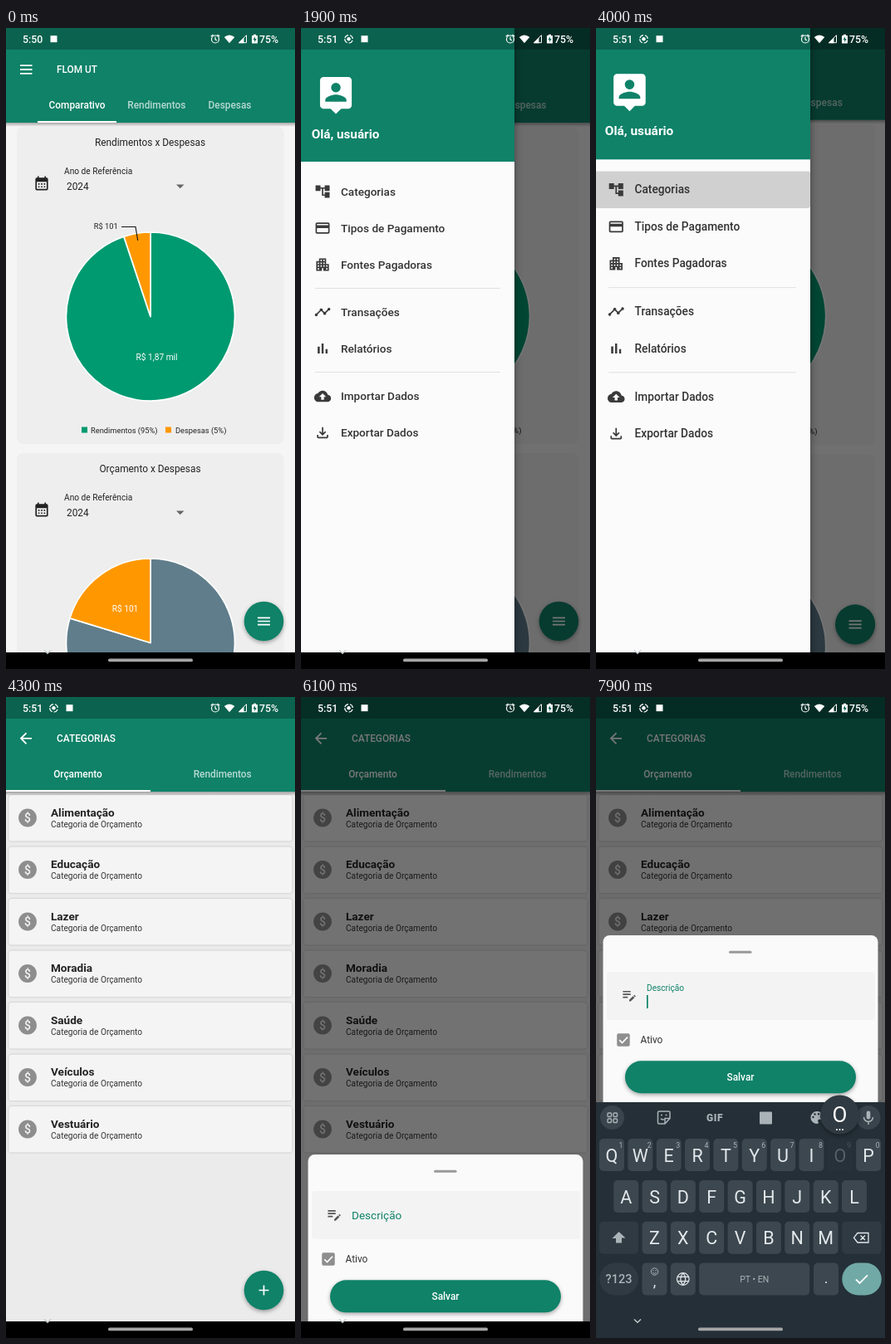
An HTML page for the animation above (8000 ms loop, 348x772 px).

```html
<!DOCTYPE html>
<html lang="pt">
<head>
<meta charset="utf-8">
<title>Finanças</title>
<style>
html, body { margin: 0; width: 100%; height: 100%; overflow: hidden; background: #000; }
svg { display: block; width: 100%; height: 100%; font-family: Roboto, "Noto Sans", sans-serif; }
.lift { filter: drop-shadow(0 2px 2.5px rgba(0,0,0,.35)); }
.card { filter: drop-shadow(0 .8px .8px rgba(0,0,0,.22)); }
.side { filter: drop-shadow(1px 0 4px rgba(0,0,0,.35)); }
</style>
</head>
<body>
<svg id="stage" viewBox="0 0 348 772" xmlns="http://www.w3.org/2000/svg"></svg>
<script>
const LOOP = 8000, STEP = 100;
const GREEN = '#0f8268', ORANGE = '#ff9800', INK = '#232323', DP = 0.847;
const PANEL = 257, SHEET = 201, KEYS = 284;

const ICONS = {
  tree: 'M22 11V3h-7v3H9V3H2v8h7V8h2v10h4v3h7v-8h-7v3h-2V8h2v3z',
  card: 'M20 4H4c-1.1 0-2 .9-2 2v12c0 1.1.9 2 2 2h16c1.1 0 2-.9 2-2V6c0-1.1-.9-2-2-2zm0 14H4v-6h16v6zm0-10H4V6h16v2z',
  building: 'M17 11V3H7v4H3v14h8v-4h2v4h8V11h-4zM7 19H5v-2h2v2zm0-4H5v-2h2v2zm0-4H5V9h2v2zm4 4H9v-2h2v2zm0-4H9V9h2v2zm0-4H9V5h2v2zm4 8h-2v-2h2v2zm0-4h-2V9h2v2zm0-4h-2V5h2v2zm4 12h-2v-2h2v2zm0-4h-2v-2h2v2z',
  line: 'M1 16a2 2 0 0 1 2.500-1.900L8.100 9.500A2 2 0 1 1 11.900 9.500L14.500 12.100H15.500L19.100 8.500A2 2 0 1 1 20.500 9.900L16.900 13.500A2 2 0 1 1 13.100 13.500L10.500 10.900H9.500L4.900 15.500A2 2 0 1 1 1 16z',
  bars: 'M5 9.200h3V19H5zM10.600 5h2.800v14h-2.800zm5.600 8H19v6h-2.800z',
  cloud: 'M19.350 10C18.700 6.600 15.600 4 12 4 9.100 4 6.600 5.600 5.350 8 2.300 8.400 0 10.900 0 14c0 3.300 2.700 6 6 6h13c2.800 0 5-2.200 5-5 0-2.600-2-4.800-4.650-5zM14 13v4h-4v-4H7l5-5 5 5h-3z',
  save: 'M18 15v3H6v-3H4v3c0 1.100.9 2 2 2h12c1.100 0 2-.9 2-2v-3h-2zm-1-4l-1.400-1.400L13 12.200V4h-2v8.200L8.400 9.600 7 11l5 5 5-5z',
  person: 'M19 2H5a2 2 0 0 0-2 2v14a2 2 0 0 0 2 2h4l3 3 3-3h4a2 2 0 0 0 2-2V4a2 2 0 0 0-2-2zm-7 3.300a2.700 2.700 0 1 1 0 5.400 2.700 2.700 0 0 1 0-5.400zM18 16H6v-.9c0-2 4-3.100 6-3.100s6 1.100 6 3.100v.9z',
  month: 'M19 4h-1V2h-2v2H8V2H6v2H5a2 2 0 0 0-2 2v14a2 2 0 0 0 2 2h14a2 2 0 0 0 2-2V6a2 2 0 0 0-2-2zm0 16H5V10h14v10zM9 14H7v-2h2v2zm4 0h-2v-2h2v2zm4 0h-2v-2h2v2zm-8 4H7v-2h2v2zm4 0h-2v-2h2v2zm4 0h-2v-2h2v2z',
  note: 'M3 10h11v2H3v-2zm0-2h11V6H3v2zm0 8h7v-2H3v2zm15-3.100l.7-.7a1 1 0 0 1 1.400 0l.7.7a1 1 0 0 1 0 1.400l-.7.7-2.100-2.100zm-.7.700l-5.300 5.300V21h2.100l5.300-5.300-2.100-2.100z'
};

// Markup helpers
const rect = (x, y, w, h, fill, r = 0, more = '') =>
  `<rect x="${x}" y="${y}" width="${w}" height="${h}" rx="${r}" fill="${fill}" ${more}/>`;
const disc = (x, y, r, fill, more = '') => `<circle cx="${x}" cy="${y}" r="${r}" fill="${fill}" ${more}/>`;
const text = (x, y, s, size, fill = INK, weight = 400, anchor = 'start', more = '') =>
  `<text x="${x}" y="${y}" font-size="${size}" fill="${fill}" font-weight="${weight}" text-anchor="${anchor}" ${more}>${s}</text>`;
const mid = (x, y, s, size, fill, weight, more) => text(x, y, s, size, fill, weight, 'middle', more);
const stroke = (d, color, w = 1.5, more = '') =>
  `<path d="${d}" fill="none" stroke="${color}" stroke-width="${w}" ${more}/>`;
const shape = (d, fill, more = '') => `<path d="${d}" fill="${fill}" ${more}/>`;
const icon = (name, cx, cy, fill, k = DP) =>
  `<path d="${ICONS[name]}" fill="${fill}" transform="translate(${cx - 12 * k} ${cy - 12 * k}) scale(${k})"/>`;
const group = (id, body, more = '') => `<g id="${id}" ${more}>${body}</g>`;
const each = (list, fn) => [...list].map(fn).join('');

function slice(cx, cy, r, from, to, fill) {
  const at = a => `${cx + r * Math.sin(a * Math.PI / 180)} ${cy - r * Math.cos(a * Math.PI / 180)}`;
  return shape(`M${cx} ${cy}L${at(from)}A${r} ${r} 0 ${to - from > 180 ? 1 : 0} 1 ${at(to)}z`, fill,
    'stroke="#fff" stroke-width="1.700" stroke-linejoin="round"');
}

function appBar(title, nav, tabs, markX, markW) {
  return rect(0, 114, 348, 5, 'url(#fall)') + rect(0, 0, 348, 114, GREEN) +
    stroke(nav, '#fff', 1.8) + text(61, 54, title, 11.86, '#fff', 500) +
    tabs.map(([x, s], i) => mid(x, 97.2, s, 11.86, i ? 'rgba(255,255,255,.7)' : '#fff', 500)).join('') +
    rect(markX, 112, markW, 2, '#fff');
}

function fab(d) {
  return disc(310.5, 714.5, 23.8, GREEN, 'class="lift"') + stroke(d, '#fff', 1.7);
}

function chartCard(y, title, pie) {
  return rect(13, y, 321.500, 382, '#eee', 8) + mid(173.5, y + 23, title, 11.86) +
    icon('month', 43, y + 68, INK) + text(70, y + 57, 'Ano de Referência', 10.16) +
    text(73, y + 76, '2024', 11.86) + shape(`M205 ${y + 69.5}h9.500l-4.750 4.700z`, '#666') + pie;
}

function home() {
  const first = slice(174, 347.5, 101.5, 0, 341.6, '#009a70') + slice(174, 347.5, 101.5, 341.6, 360, ORANGE) +
    stroke('M139 239.500H156L158.700 256', '#111', 1.1) + text(105.7, 241.5, 'R$ 101', 9.3) +
    mid(181.5, 400.3, 'R$ 1,87 mil', 10.16, '#fff') +
    rect(91, 480.5, 7, 7, '#009a70') + text(102, 487.5, 'Rendimentos (95%)', 9.3) +
    rect(192, 480.5, 7, 7, ORANGE) + text(204, 487.5, 'Despesas (5%)', 9.3);
  const second = slice(174, 740.5, 101.5, 0, 287, '#607d8b') + slice(174, 740.5, 101.5, 287, 360, ORANGE) +
    mid(143.5, 703, 'R$ 101', 10.16, '#fff');
  return rect(0, 0, 348, 772, '#f5f5f5') + chartCard(119, 'Rendimentos x Despesas', first) +
    chartCard(512, 'Orçamento x Despesas', second) +
    appBar('FLOM UT', 'M17 45.200H31.500M17 50H31.500M17 54.800H31.500',
      [[85.5, 'Comparativo'], [181.3, 'Rendimentos'], [269.5, 'Despesas']], 38, 95) +
    fab('M303 710.300H318M303 714.500H318M303 718.700H318');
}

function drawer() {
  const rows = [[197, 'tree', 'Categorias'], [241, 'card', 'Tipos de Pagamento'], [285, 'building', 'Fontes Pagadoras'],
    [342, 'line', 'Transações'], [386, 'bars', 'Relatórios'], [443.5, 'cloud', 'Importar Dados'], [487.5, 'save', 'Exportar Dados']];
  return rect(0, 0, PANEL, 772, '#fbfbfb', 0, 'class="side"') + rect(0, 0, PANEL, 161, GREEN) +
    icon('person', 42, 80.3, '#fff', 2.12) + text(12.7, 132.5, 'Olá, usuário', 15.25, '#fff', 700) +
    group('ink', rect(0, 175, PANEL, 44, '#000', 3, 'id="glow"') +
      disc(130, 197, 1, '#000', 'id="splash" clip-path="none"'), 'clip-path="url(#row)"') +
    rect(17, 313, 223, 1, '#e0e0e0') + rect(17, 414, 223, 1, '#e0e0e0') +
    each(rows, ([y, name, s]) => icon(name, 26, y, '#3a3a3a') + text(48, y + 4.6, s, 13.55, '#333', 500));
}

function categories() {
  const names = ['Alimentação', 'Educação', 'Lazer', 'Moradia', 'Saúde', 'Veículos', 'Vestuário'];
  return rect(0, 0, 348, 772, '#ebebeb') +
    names.map((s, i) => {
      const y = 118 + 62.5 * i;
      return rect(3.4, y, 341, 55.5, '#f4f4f4', 3.5, 'class="card"') + disc(26, y + 27.5, 10.9, '#8e8e8e') +
        mid(26, y + 32.4, '$', 14, '#f4f4f4', 500) + text(54, y + 25.8, s, 13.55, INK, 700) +
        text(54, y + 38.8, 'Categoria de Orçamento', 10.16, '#333');
    }).join('') +
    appBar('CATEGORIAS', 'M31 49.800H18M24.500 43.300L18 49.800L24.500 56.300', [[86.5, 'Orçamento'], [260.7, 'Rendimentos']], 0, 174) +
    fab('M304.500 714.500H316.500M310.500 708.500V720.500');
}

function sheet() {
  return rect(8.5, 0, 331, 260, '#fafafa', 8) + rect(160, 18.8, 27.5, 3, '#999', 1.5) +
    rect(13, 44, 323, 58, '#f3f3f3', 4) + icon('note', 40, 72, '#555') +
    text(61, 77.5, 'Descrição', 13.55, '#666', 400, 'start', 'id="label"') +
    rect(61, 72, 1.7, 16, GREEN, 0, 'id="caret"') +
    rect(25.2, 118.3, 15.5, 15.5, '#8e8e8e', 2) + stroke('M28.200 126.200L31.500 129.500L38 122.700', '#fff', 1.7) +
    text(53.5, 130.3, 'Ativo', 11.86, '#333') +
    rect(35, 151.3, 278, 39, GREEN, 19.5, 'class="lift"') + mid(174, 175.2, 'Salvar', 11.86, '#fff', 500);
}

function keyboard() {
  const key = '#3c474f', dark = '#2f3a43', pale = '#e3e8eb', soft = '#aab3b8', pitch = 34.35;
  const rows = [['qwertyuiop', 19, 44], ['asdfghjkl', 36.2, 94], ['zxcvbnm', 70.5, 143.7]];
  const onKeys = fn => each(rows, ([s, x, y]) => [...s].map((c, i) => fn(c, x + pitch * i, y)).join(''));
  const letters = upper => onKeys((c, x, y) =>
    mid(x, y + (upper ? 27.5 : 26.5), upper ? c.toUpperCase() : c, 21.5, pale, 400, `class="k-${c}"`));
  const tools = disc(19.5, 18.5, 14.5, '#39444c') + disc(328, 18.5, 14.5, '#39444c') +
    each([[14, 13], [21, 13], [14, 20], [21, 20]], ([x, y]) => rect(x, y, 4.5, 4.5, 'none', 1, `stroke="${soft}" stroke-width="1.400"`)) +
    stroke('M76 11H87.500Q89 11 89 12.500V19.500L83 26H76Q74.500 26 74.500 24.500V12.500Q74.500 11 76 11zM89 19.500H83V26M78 19.500Q80 22 82 20.500', soft, 1.5) +
    disc(79, 15.5, 1, soft) + disc(84.500, 15.5, 1, soft) + mid(143, 23, 'GIF', 12, soft, 900, 'letter-spacing=".6"') +
    rect(197, 11.5, 15, 15, soft, 1) +
    shape('M266 11a7.500 7.500 0 0 0 0 15c2 0 2.300-1.500 1.500-2.500-1-1.500 0-2.700 1.500-2.700h2c1.500 0 2.700-1.300 2.700-3.500C273.500 13.500 270 11 266 11z', soft) +
    each([[261.5, 18], [263.5, 14.5], [268, 14.3], [271, 17.5]], ([x, y]) => disc(x, y, 1.2, '#242f37')) +
    rect(325.7, 10.5, 4.6, 10, soft, 2.3) + stroke('M322.500 18a5.500 5.500 0 0 0 11 0M328 23.500V27', soft, 1.5);
  const low = rect(4, 193.5, 47, 39, dark, 19.5) + mid(27.5, 218, '?123', 14.500, soft, 500) +
    rect(55.5, 193.5, 30, 39, key, 5) + mid(70.5, 222, ',', 18, pale) +
    stroke('M66.300 204a4.200 4.200 0 1 0 8.400 0a4.200 4.200 0 1 0-8.400 0M68.300 205.200q2.200 2.500 4.400 0', soft, 1) +
    disc(69, 202.8, .7, soft) + disc(72, 202.8, .7, soft) +
    rect(89.8, 193.5, 30, 39, key, 5) +
    stroke('M97.500 213a7.300 7.300 0 1 0 14.600 0a7.300 7.300 0 1 0-14.600 0M98.300 210.300h13M98.300 215.700h13M104.800 205.700q-6 7.300 0 14.600q6-7.300 0-14.600', pale, 1.2) +
    rect(124.200, 193.5, 133, 39, key, 5) + mid(190.7, 216.8, 'PT • EN', 10.5, soft) +
    rect(262, 193.5, 30, 39, key, 5) + mid(277, 218, '.', 18, pale) +
    rect(296.3, 193.5, 47.500, 39, '#70a9a6', 19.5) + stroke('M313 213.500L317.500 218L327 208.300', '#fff', 1.8);
  const arrow = 'M27.500 156L35 164H31V169.500H24V164H20z'.replace('L35 164', 'L35.500 163.500').replace('H20z', 'H19.500z');
  return rect(0, 0, 348, 300, '#242f37') + tools +
    onKeys((c, x, y) => rect(x - 15, y, 30, 39, key, 5, `class="b-${c}"`)) +
    each([...'1234567890'], (d, i) => 0) .slice(0, 0) +
    [...'1234567890'].map((d, i) => mid(30 + pitch * i, 54.5, d, 8.800, soft, 400, `class="n-${d}"`)).join('') +
    rect(4, 143.7, 47, 39, dark, 5) + rect(296.3, 143.7, 47.500, 39, dark, 5) +
    stroke('M315 157.500H328V169H315L310.500 163.200zM318.500 160.500L324 166M324 160.500L318.500 166', pale, 1.3) +
    group('lower', letters(false) + stroke(arrow, pale, 1.4)) + group('upper', letters(true) + shape(arrow, soft)) + low +
    group('bubble', disc(293.5, 15, 23.5, '#303a42', 'class="lift"') + mid(293.5, 23.8, 'O', 26, '#fff') +
      each([290, 293.5, 297], x => disc(x, 33, 1, '#fff')));
}

function statusBar() {
  return rect(0, 0, 348, 26, 'rgba(0,0,0,.25)') +
    text(20, 18, '5:50', 12.3, '#fff', 500, 'start', 'id="clock"') +
    group('rec', disc(57.500, 13.300, 2.200, '#fff') +
      stroke('M52.700 13.300a4.800 4.800 0 1 0 9.600 0a4.800 4.800 0 1 0-9.600 0', '#fff', 1.2, 'stroke-dasharray="5.500 2.040"')) +
    group('app', rect(53.5, 9.2, 8, 8, '#fff')) +
    stroke('M247.500 13.500a4.500 4.500 0 1 0 9 0a4.500 4.500 0 1 0-9 0M252 10.800V13.800L254 15M246.700 10.200L249.500 8M257.300 10.200L254.500 8', '#fff', 1.2) +
    shape('M262.800 11Q269 6 275.300 11L269 18.300z', '#fff') +
    stroke('M280.500 17.700L289.500 8.700V17.700z', '#fff', 1) + shape('M280 18.200L286.500 11.700V18.200z', '#fff') +
    shape('M296.500 9H298V7.700H301V9H302.500Q303 9 303 9.500V18Q303 18.500 302.500 18.500H296.500Q296 18.500 296 18V9.500Q296 9 296.500 9z', '#fff') +
    shape('M300 10.200L297.500 14.300H299.200V17.200L301.700 13H300z', '#0b6150') +
    text(305, 18, '75%', 12.3, '#fff', 500);
}

const stage = document.getElementById('stage');
stage.innerHTML = `<defs>
  <linearGradient id="fall" x2="0" y2="1"><stop stop-opacity=".32"/><stop offset="1" stop-opacity="0"/></linearGradient>
  <clipPath id="row">${rect(0, 175, PANEL, 44, '#000', 3)}</clipPath></defs>` +
  group('home', home() + rect(0, 0, 348, 772, '#000', 0, 'id="veil"') + group('drawer', drawer())) +
  group('cats', categories()) + rect(0, 0, 348, 772, '#000', 0, 'id="shade"') +
  group('sheet', sheet()) + rect(0, 752, 348, 20, '#000') + group('keyboard', keyboard()) +
  stroke('M46 749.500L50 753.300L54 749.500', '#c3cacd', 1.4, 'id="fold"') +
  rect(123, 759.5, 102, 3.8, '#a6a6a6', 1.9) + statusBar();

const el = {};
stage.querySelectorAll('[id]').forEach(n => el[n.id] = n);
const set = (id, attrs) => { for (const k in attrs) el[id].setAttribute(k, attrs[k]); };
const show = (id, on) => set(id, { visibility: on ? 'visible' : 'hidden' });
const move = (id, x, y) => set(id, { transform: `translate(${x} ${y})` });
const zoom = (id, k) => set(id, { transform: `translate(174 386) scale(${k}) translate(-174 -386)` });
const span = (t, from, length) => Math.min(1, Math.max(0, (t - from) / length));

// Cubic bezier (.4, 0, .2, 1)
function ease(x) {
  let lo = 0, hi = 1, s = x;
  for (let i = 0; i < 24; i++) {
    s = (lo + hi) / 2;
    const at = 1.2 * (1 - s) ** 2 * s + 0.6 * (1 - s) * s * s + s ** 3;
    if (at < x) lo = s; else hi = s;
  }
  return 3 * (1 - s) * s * s + s ** 3;
}

function draw(t) {
  // Status icons
  const slide = ease(span(t, 200, 400));
  move('app', 19 * slide, 0);
  set('rec', { opacity: span(t, 300, 300) });
  el.clock.textContent = t < 1800 ? '5:50' : '5:51';

  // Drawer and row ripple
  const open = 1 - (1 - span(t, 1400, 500)) ** 2.1;
  move('drawer', PANEL * (open - 1), 0);
  show('drawer', open > 0);
  set('veil', { opacity: 0.54 * open });
  const press = span(t, 3000, 950);
  set('glow', { opacity: 0.08 * span(t, 3000, 250) });
  set('splash', { r: press ? 15 + 125 * press : 0, opacity: 0.1 * span(t, 3000, 200) });

  // Page change
  const turn = span(t, 3900, 400), turned = ease(turn);
  zoom('home', 1 + 0.05 * turned);
  zoom('cats', 0.85 + 0.15 * turned);
  set('cats', { opacity: span(turn, 0.25, 0.2) });
  show('cats', turn > 0.25);
  show('home', turn < 1);
  if (turn === 1) show('drawer', false);

  // Bottom sheet and keyboard
  const rise = span(t, 5700, 410), typed = ease(span(t, 6700, 450));
  const top = 772 - KEYS * typed;
  set('shade', { opacity: 0.54 * rise ** 0.8 });
  move('sheet', 0, Math.min(752, top) - SHEET * ease(rise));
  show('sheet', rise > 0);
  move('keyboard', 0, top);
  show('keyboard', typed > 0);
  show('fold', typed > 0);

  // Field focus
  const focus = ease(span(t, 6500, 200));
  set('label', { y: 77.5 - 11 * focus, 'font-size': 13.55 - 3.39 * focus, fill: focus > 0 ? GREEN : '#666' });
  show('caret', t >= 6600 && (t - 6600) % 1000 < 500);

  // Key states
  const caps = t >= 7100, tap = t >= 7800;
  set('lower', { display: caps ? 'none' : 'inline' });
  set('upper', { display: caps ? 'inline' : 'none' });
  set('bubble', { display: tap ? 'inline' : 'none' });
  stage.querySelectorAll('.k-o, .n-9').forEach(n => n.setAttribute('opacity', tap ? 0.25 : 1));
  stage.querySelector('.b-o').setAttribute('opacity', tap ? 0.1 : 1);
}

const start = performance.now();
function tick() {
  const t = (performance.now() - start) % LOOP;
  draw(Math.floor((t + 10) / STEP) * STEP % LOOP);
  requestAnimationFrame(tick);
}
tick();
</script>
</body>
</html>
```
